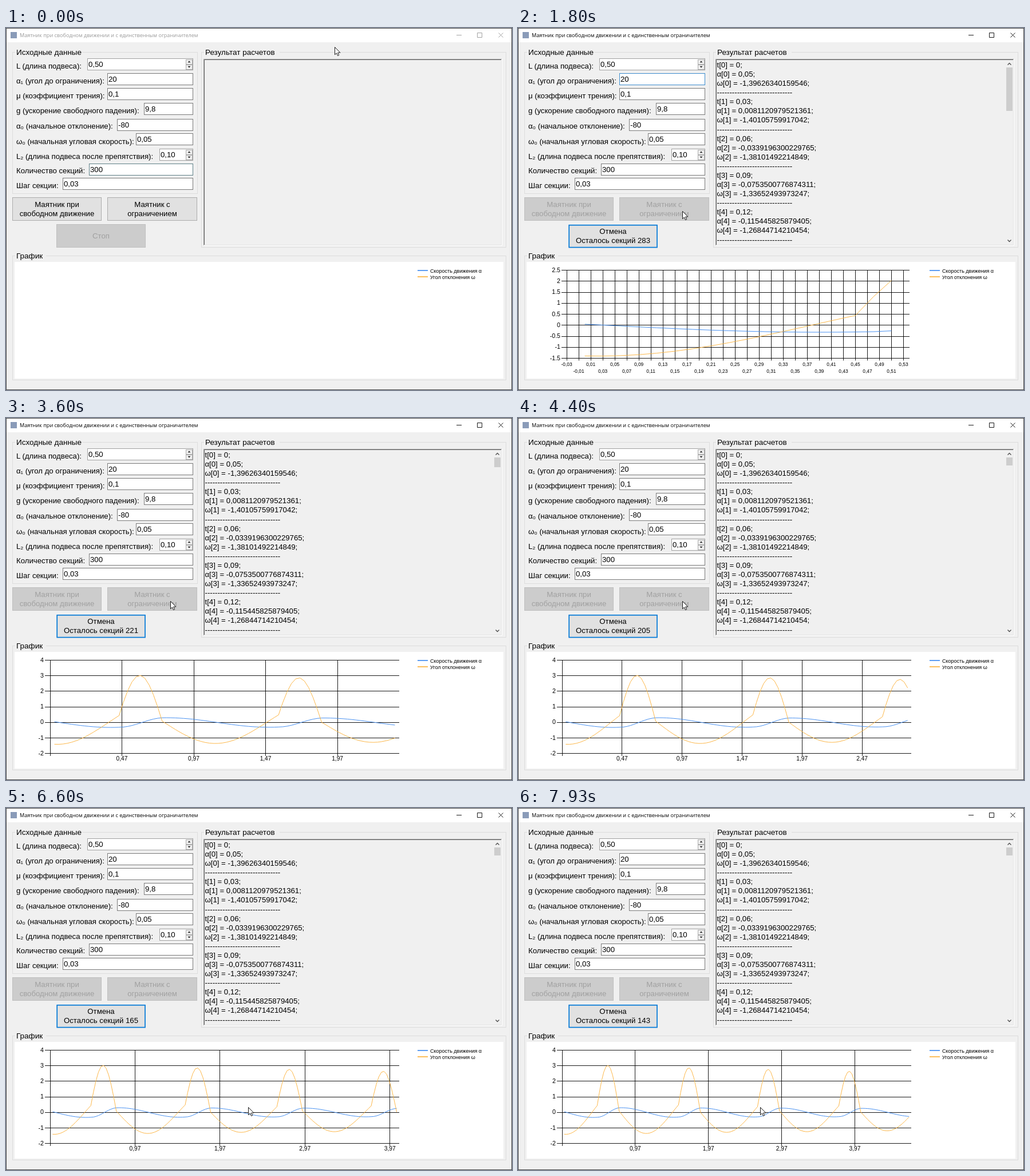
These frames come from a looping animation (884 px wide and 633 px high, 8000 ms). An HTML page:

```html
<!DOCTYPE html>
<html lang="ru">
<head>
<meta charset="utf-8">
<style>
html, body { margin: 0; width: 100%; height: 100%; overflow: hidden; background: #f0f0f0; }
svg { display: block; width: 884px; height: 633px; }
text { font-family: "Liberation Sans", Arial, sans-serif; font-size: 13.2px; white-space: pre; }
.title { font-family: "Open Sans", "Noto Sans", sans-serif; font-size: 9.1px; }
.caption { font-size: 13.5px; }
.mid { text-anchor: middle; }
.end { text-anchor: end; }
</style>
</head>
<body>
<svg id="stage" viewBox="0 0 884 633"></svg>
<script>
const LOOP = 8000, TICK = LOOP / 120, START = 23, DT = 0.03;
const BLUE = '#418cf0', ORANGE = '#fcb441', ACCENT = '#0078d7';
const stage = document.getElementById('stage');

function add(tag, attrs, parent = stage, content = '') {
  const node = document.createElementNS('http://www.w3.org/2000/svg', tag);
  for (const key in attrs) node.setAttribute(key, attrs[key]);
  node.textContent = content;
  parent.appendChild(node);
  return node;
}
const set = (node, attrs) => { for (const key in attrs) node.setAttribute(key, attrs[key]); };
const text = (x, y, s, attrs = {}, parent = stage) => add('text', { x, y, ...attrs }, parent, s);
const box = (x, y, width, height, fill, stroke = 'none', parent = stage) =>
  add('rect', { x: x + .5, y: y + .5, width: width - 1, height: height - 1, fill, stroke }, parent);
const path = (d, stroke, attrs = {}, parent = stage) => add('path', { d, stroke, fill: 'none', ...attrs }, parent);

// Piecewise linear value through [key, value...] stops
function track(stops, k) {
  if (k <= stops[0][0]) return stops[0].slice(1);
  for (let i = 1; i < stops.length; i++) {
    const [a, ...from] = stops[i - 1], [b, ...to] = stops[i];
    if (k <= b) return from.map((v, j) => v + (to[j] - v) * (k - a) / (b - a));
  }
  return stops[stops.length - 1].slice(1);
}

// Pendulum: the suspension shortens past the 20 degree limit
const alpha = [0.05], omega = [-80 * Math.PI / 180];
for (let i = 0; i < 160; i++) {
  const length = omega[i] > 20 * Math.PI / 180 ? 0.1 : 0.5;
  const a = alpha[i] + DT * omega[i];
  alpha.push(a);
  omega.push(omega[i] - DT * (9.8 / length * Math.sin(a) + 0.1 * a));
}

// Window frame
add('rect', { width: 884, height: 633, fill: '#f0f0f0' });
add('rect', { width: 884, height: 25, fill: '#fff' });
add('rect', { x: .5, y: .5, width: 883, height: 632, fill: 'none', stroke: '#4a4a4a' });
add('rect', { x: 8, y: 7, width: 11, height: 11, fill: '#8a9bb8' });
const title = text(24, 16, 'Маятник при свободном движении и с единственным ограничителем', { class: 'title' });
const controls = path('M787 12.5h9M823.5 8.5h8v8h-8zM860.5 8.5l8 8m0 -8l-8 8', '#000', { 'stroke-width': .9 });

function group(x, y, w, h, label, gap) {
  box(x, y, w, h, 'none', '#dcdcdc');
  add('rect', { x: x + 5, y: y - 2, width: gap, height: 5, fill: '#f0f0f0' });
  text(x + 7, y + 5, label, { class: 'caption' });
}
group(11, 42, 324, 248, 'Исходные данные', 117);
group(341, 42, 533, 342, 'Результат расчетов', 132);
group(11, 398, 863, 218, 'График', 54);

// Input fields: label, baseline, x, y, value
const fields = [
  ['L (длина подвеса):', 71, 142, 53, '0,50'],
  ['α₁ (угол до ограничения):', 96.5, 177, 79, '20'],
  ['μ (коэффициент трения):', 123, 177, 105, '0,1'],
  ['g (ускорение свободного падения):', 149, 241, 131, '9,8'],
  ['α₀ (начальное отклонение):', 176, 194, 159, '-80'],
  ['ω₀ (начальная угловая скорость):', 203, 227, 184, '0,05'],
  ['L₂ (длина подвеса после препятствия):', 228.5, 268, 211, '0,10'],
  ['Количество секций:', 254, 145, 237, '300'],
  ['Шаг секции:', 280, 99, 262, '0,03']
].map(([label, base, x, y, value], i) => {
  text(18, base, label);
  const spin = i === 0 || i === 6;
  const frame = box(x, y, 327 - x, 21, '#fff', spin ? '#a0a0a0' : '#7a7a7a');
  text(x + 2, y + 15, value);
  if (spin) for (const dir of [-1, 1]) {
    const cy = y + 10.5 + dir * 4.5;
    box(314, Math.round(cy - 4.5), 12, 9, '#f0f0f0', '#acacac');
    add('path', { d: `M317.5 ${cy - dir * 1.2}h5l-2.5 ${dir * 2.6}z`, fill: '#222' });
  }
  return frame;
});

// Buttons
function button(x, y, w, h, lines) {
  const face = box(x, y, w, h, '#e1e1e1', '#adadad');
  const rows = lines.map((s, i) => text(x + w / 2, y + 17 + i * 16, s, { class: 'mid' }));
  return { face, rows };
}
const paint = (b, fill, stroke, color, width = 1) => {
  set(b.face, { fill, stroke, 'stroke-width': width });
  b.rows.forEach(r => r.setAttribute('fill', color));
};
const freeButton = button(11, 296, 156, 41, ['Маятник при', 'свободном движение']);
const limitButton = button(177, 296, 157, 41, ['Маятник с', 'ограничением']);
const stopButton = button(88, 343, 156, 41, ['', '']);
const stopLabel = text(166, 368, 'Стоп', { class: 'mid', fill: '#a0a0a0' });

// Results pane
path('M345.5 380V54.5H866', '#a0a0a0');
path('M346.5 379V55.5H865', '#696969');
path('M346 379.5H865.5V56', '#e3e3e3');
path('M345 380.5H866.5V54', '#fff');
const results = add('g');
const rows = [
  ['0', '0,05', '-1,39626340159546'],
  ['0,03', '0,0081120979521361', '-1,40105759917042'],
  ['0,06', '-0,0339196300229765', '-1,38101492214849'],
  ['0,09', '-0,0753500776874311', '-1,33652493973247'],
  ['0,12', '-0,115445825879405', '-1,26844714210454']
].map((values, i) => {
  const entry = add('g', {}, results);
  [...values.map((v, j) => `${'tαω'[j]}[${i}] = ${v};`), '-'.repeat(30)].forEach((s, j) =>
    text(347.5, 69 + (i * 4 + j) * 16.08, s, {}, entry));
  return entry;
});
const scroll = add('g', {}, results);
path('M855.5 64.5l3 -3 3 3M855.5 370.5l3 3 3 -3', '#505050', { 'stroke-width': 1.4 }, scroll);
const thumb = add('rect', { x: 853, y: 69, width: 11, fill: '#cdcdcd' }, scroll);

// Chart
add('rect', { x: 15, y: 409, width: 854, height: 204, fill: '#fff' });
[[BLUE, 'Скорость движения α'], [ORANGE, 'Угол отклонения ω']].forEach(([color, label], i) => {
  path(`M719 ${424 + i * 11}h18`, color, { 'stroke-width': 1.7 });
  text(741, 427.5 + i * 11.5, label, { style: 'font-size:9px' });
});
const chart = add('g');
const cursor = add('path', {
  d: 'M0 0V13.2L3 10.4L5 15L7.2 14L5.2 9.6H9.4Z', fill: '#fff', stroke: '#000', 'stroke-width': .9
});

function niceStep(d) {
  const power = 10 ** Math.floor(Math.log10(d)), m = d / power - 1e-9;
  return power * (m <= 1.5 ? 1 : m <= 3 ? 2 : m <= 7 ? 5 : 10);
}

function drawChart(n) {
  chart.textContent = '';
  const all = [...alpha.slice(0, n + 1), ...omega.slice(0, n + 1)];
  const low = Math.min(...all), high = Math.max(...all), yStep = niceStep((high - low) / 5);
  const y0 = Math.floor(low / yStep) * yStep, y1 = Math.ceil(high / yStep) * yStep;
  const x0 = -DT, x1 = (n + 1) * DT, range = x1 - x0;
  const xStep = niceStep(n < 18 ? DT : range / 5);
  const staggered = xStep / range * 600 < 40;
  const left = yStep < 1 ? 85 : 77, right = staggered ? 684 : 687;
  const top = 423.5, bottom = staggered ? 577.5 : 586.9;
  const px = v => left + (v - x0) / range * (right - left);
  const py = v => bottom - (v - y0) / (y1 - y0) * (bottom - top);
  const pixel = v => Math.floor(v) + .5;

  let grid = '';
  for (let i = 0; i <= Math.round((y1 - y0) / yStep); i++) {
    const v = y0 + i * yStep, y = py(v);
    grid += `M${left - 9} ${pixel(y)}H${right}`;
    text(left - 11, y + 3, String(+v.toFixed(1)), { class: 'end', style: 'font-size:10.6px' }, chart);
  }
  for (let i = 0; x0 + i * xStep <= x1 + 1e-9; i++) {
    const v = x0 + i * xStep, x = px(v);
    grid += `M${pixel(x)} ${top}V${bottom + 4}`;
    if (i || staggered) text(x, staggered ? 590.5 + i % 2 * 12 : 599, v.toFixed(2).replace('.', ','),
      { class: 'mid', style: `font-size:${staggered ? 8.4 : 10.2}px` }, chart);
  }
  path(grid, '#000', { 'stroke-width': .9 }, chart);
  [[alpha, BLUE], [omega, ORANGE]].forEach(([data, color]) => path(
    'M' + data.slice(0, n + 1).map((v, i) => `${px(i * DT).toFixed(2)} ${py(v).toFixed(2)}`).join('L'),
    color, { 'stroke-linejoin': 'round', 'stroke-width': .95 }, chart));
}

const progress = [[23, 0], [27, 17], [39, 54], [41, 54], [42, 56], [54, 79], [66, 95], [83, 119], [99, 135], [119, 157]];
const returnPath = [[92, 287.5, 320.5], [93, 300, 326], [94, 345, 296], [95, 385, 269],
  [96, 402, 340], [97, 413, 430], [98, 420, 500], [99, 423.5, 523.5]];

function cursorAt(k) {
  if (k > 92) return track(returnPath, k);
  const u = Math.min(k / 11, 1), e = u * u * (3 - 2 * u);
  return [574.5 - 287 * e, 33.5 + 287 * e];
}

function render(k) {
  const running = k >= START, n = Math.floor(track(progress, k)[0] + 1e-6);
  const [cx, cy] = cursorAt(k);
  title.setAttribute('fill', running ? '#000' : '#999');
  controls.setAttribute('stroke', running ? '#000' : '#999');
  set(fields[1], { stroke: running && k < 31 ? '#3c8ccd' : '#7a7a7a' });
  set(fields[7], { stroke: running ? '#7a7a7a' : '#5d7f86' });

  const hover = cx >= 177 && cx < 334 && cy >= 296 && cy < 337;
  const off = ['#cccccc', '#bfbfbf', '#a0a0a0'], on = ['#e1e1e1', '#adadad', '#000'];
  paint(freeButton, ...(running ? off : on));
  paint(limitButton, ...(running ? off : hover ? ['#e5f1fb', ACCENT, '#000'] : on));
  if (running) paint(stopButton, '#e1e1e1', ACCENT, '#000', 1.7);
  else paint(stopButton, ...off);
  set(stopButton.face, running
    ? { x: 89.2, y: 344.7, width: 153.8, height: 38.9 }
    : { x: 88.5, y: 343.5, width: 155, height: 40 });
  stopButton.rows[0].textContent = running ? 'Отмена' : '';
  stopButton.rows[1].textContent = running ? `Осталось секций ${300 - n}` : '';
  stopLabel.textContent = running ? '' : 'Стоп';

  results.style.display = chart.style.display = running ? '' : 'none';
  if (running) {
    rows.forEach((row, i) => row.style.display = i <= n ? '' : 'none');
    scroll.style.display = n >= 5 ? '' : 'none';
    thumb.setAttribute('height', Math.max(14, Math.round(1370 / (n + 1))));
    drawChart(n);
  }
  cursor.setAttribute('transform', `translate(${cx} ${cy})`);
}

let shown = -1;
const origin = performance.now();
function loop() {
  const time = (performance.now() - origin) % LOOP;
  const k = Math.min(119, Math.floor(time / TICK + .1));
  if (k !== shown) render(shown = k);
  requestAnimationFrame(loop);
}
loop();
</script>
</body>
</html>
```
